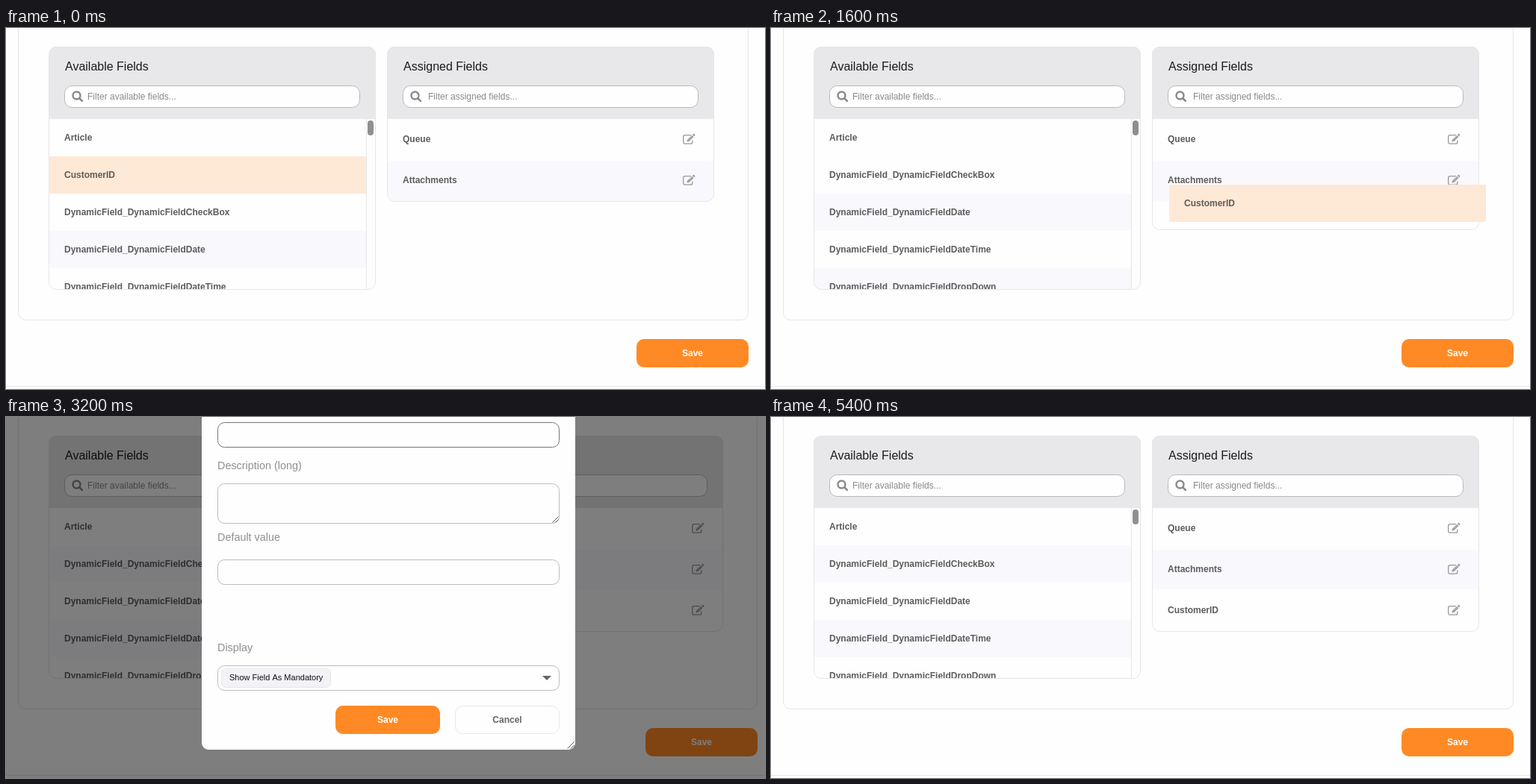
Write an HTML page with a canvas that moves like this. It is 1016 px wide and 484 px high and loops after 6000 ms.

```html
<!DOCTYPE html>
<html lang="en">
<head>
<meta charset="utf-8">
<title>Assigning fields</title>
<style>
html, body { margin: 0; width: 100%; height: 100%; overflow: hidden; background: #fefefe; }
canvas { display: block; width: 1016px; height: 484px; }
</style>
</head>
<body>
<canvas id="stage" width="1016" height="484"></canvas>
<script>
const ctx = document.getElementById('stage').getContext('2d');
const LOOP = 6000, STEP = 200;
const DRAG = 800, OPEN = 2600, HOVER = 3400, SUBMIT = 3800, CLOSE = 4000;
const PAPER = '#fefefe', LINE = '#e6e6ea', STRIPE = '#f9f9fd', PEACH = '#fee8d6';
const ORANGE = '#ff8a25', INK = '#5c5c5c', FAMILY = '"Liberation Sans", Arial, sans-serif';
const FIELDS = ['CheckBox', 'Date', 'DateTime', 'DropDown']
  .map(name => 'DynamicField_DynamicField' + name);

// time, x, y of the dragged row
const PATH = [
  [800, 150, 178], [1000, 426, 189], [1200, 510, 206],
  [1400, 541, 214], [1800, 524, 206], [2200, 517, 204], [2600, 517, 204]
];

function text(str, x, y, size, color, weight = '', align = 'left') {
  ctx.font = `${weight} ${size}px ${FAMILY}`;
  ctx.textAlign = align;
  ctx.fillStyle = color;
  ctx.fillText(str, x, y);
}

const bold = (str, x, y) => text(str, x, y, 12, INK, 'bold');

function rect(x, y, w, h, color) {
  ctx.fillStyle = color;
  ctx.fillRect(x, y, w, h);
}

function box(x, y, w, h, r, fill, stroke) {
  const inset = stroke ? 0.5 : 0;
  ctx.beginPath();
  ctx.roundRect(x + inset, y + inset, w - 2 * inset, h - 2 * inset, r);
  if (fill) {
    ctx.fillStyle = fill;
    ctx.fill();
  }
  if (stroke) {
    ctx.strokeStyle = stroke;
    ctx.lineWidth = 1;
    ctx.stroke();
  }
}

function line(points, color, width = 1) {
  ctx.beginPath();
  points.forEach(([x, y]) => ctx.lineTo(x, y));
  ctx.strokeStyle = color;
  ctx.lineWidth = width;
  ctx.stroke();
}

function button(label, x, y, w, fill, color, stroke) {
  box(x, y, w, 38, 10, fill, stroke);
  text(label, x + w / 2, y + 23, 12, color, 'bold', 'center');
}

function searchIcon(x, y) {
  ctx.beginPath();
  ctx.arc(x, y, 5, 0, 7);
  ctx.strokeStyle = '#8a8a8a';
  ctx.lineWidth = 2.4;
  ctx.stroke();
  ctx.lineCap = 'round';
  line([[x + 4, y + 4], [x + 7.4, y + 7.4]], '#8a8a8a', 2.6);
  ctx.lineCap = 'butt';
}

function editIcon(x, y) {
  ctx.save();
  ctx.translate(x, y);
  ctx.beginPath();
  ctx.moveTo(3, -5.4);
  ctx.lineTo(-5, -5.4);
  ctx.arcTo(-7.3, -5.4, -7.3, -3, 2.3);
  ctx.lineTo(-7.3, 4);
  ctx.arcTo(-7.3, 6.2, -5, 6.2, 2.3);
  ctx.lineTo(2.5, 6.2);
  ctx.arcTo(4.8, 6.2, 4.8, 4, 2.3);
  ctx.lineTo(4.8, 1.6);
  ctx.strokeStyle = '#999';
  ctx.lineWidth = 1.3;
  ctx.stroke();
  line([[-0.6, 1.6], [5.4, -4.2]], '#999', 3.2);
  line([[6, -4.8], [7.6, -6.3]], '#999', 3.2);
  ctx.beginPath();
  ctx.moveTo(-2.6, 3.4);
  ctx.lineTo(-2, 0.2);
  ctx.lineTo(0.8, 3);
  ctx.fillStyle = '#999';
  ctx.fill();
  line([[0.2, 0.4], [4.6, -3.8]], '#d8d8d8', 0.7);
  ctx.restore();
}

function panel(x, w, bottom, title, hint, hintX, rows) {
  const h = bottom - 25;
  box(x, 25, w, h, 10, PAPER);
  ctx.save();
  ctx.beginPath();
  ctx.roundRect(x, 25, w, h, 10);
  ctx.clip();
  rect(x, 25, w, 97, '#e8e8ea');
  rows();
  ctx.restore();
  box(x, 25, w, h, 10, null, LINE);
  text(title, x + 22, 57, 16, '#1c1c1c');
  box(x + 21, 77, w - 42, 30, 10, PAPER, '#b9b9b9');
  searchIcon(x + 37.5, 90.5);
  text(hint, hintX, 96, 12, '#8a8a8a');
}

function availableRows(t) {
  const idle = t < DRAG, dragging = t >= DRAG && t < OPEN;
  const names = ['Article', ...(idle ? ['CustomerID'] : []), ...FIELDS];
  names.slice(0, 5).forEach((name, i) => {
    const y = 122 + 50 * i;
    const striped = dragging ? i > 0 && i % 2 === 0 : i % 2 === 1;
    if (striped) rect(58, y, 424, 50, idle && i === 1 ? PEACH : STRIPE);
    bold(name, 78, y + 29);
  });
  rect(482, 122, 1, 229, LINE);
  box(484, 124, 8, 20, 4, '#8f8f8f');
}

function assignedRows(t, right) {
  const names = ['Queue', 'Attachments', ...(t >= OPEN ? ['CustomerID'] : [])];
  rect(511, 178, right - 511, t < OPEN ? 55 : 53, STRIPE);
  names.forEach((name, i) => {
    bold(name, 531, 153 + 55 * i);
    editIcon(right - 34, 149 + 55 * i);
  });
}

function page(t, wider) {
  rect(0, 0, 1016, 484, PAPER);
  box(16, -30, 978 + wider, 422, 10, null, LINE);
  panel(57, 438, 351, 'Available Fields', 'Filter available fields...', 109,
    () => availableRows(t));
  const bottom = t < DRAG + STEP ? 233 : t < OPEN ? 271 : 288;
  panel(510, 438 + wider, bottom, 'Assigned Fields', 'Filter assigned fields...', 565,
    () => assignedRows(t, 948 + wider));
  button('Save', 844 + wider, 417, 150, ORANGE, '#fff');
  rect(0, 480, 1016, 1, '#e8e8e8');
}

function draggedRow(t) {
  const i = PATH.findIndex(p => p[0] > t);
  const [t0, x0, y0] = PATH[i - 1], [t1, x1, y1] = PATH[i];
  const k = (t - t0) / (t1 - t0);
  const x = Math.round(x0 + (x1 - x0) * k), y = Math.round(y0 + (y1 - y0) * k);
  rect(x, y, 424, 50, PEACH);
  bold('CustomerID', x + 20, y + 29);
}

function grip(x, y, size) {
  line([[x - size, y], [x, y - size]], '#555');
  line([[x - size / 2, y], [x, y - size / 2]], '#555');
}

function dialog(t) {
  const sent = t >= SUBMIT;
  const input = (y, h, fill = PAPER, stroke = '#bcbcbc') => box(283, y, 458, h, 9, fill, stroke);
  const label = (str, y) => text(str, 283, y, 14.4, '#8f8f8f');

  rect(0, 0, 1016, 484, 'rgba(0, 0, 0, 0.5)');
  box(262, -20, 500, 466, 9, PAPER);
  input(7, 34, PAPER, t > OPEN ? '#777' : '#bcbcbc');
  if (!sent && (t - OPEN) % 1000 < 500) rect(294, 17, 1, 14, '#111');
  label('Description (long)', 70);
  input(89, 54);
  grip(739.5, 141.5, 8);
  label('Default value', 166);
  input(191, 34, sent ? '#eeeeee' : PAPER);
  label('Display', 314);
  input(333, 34);
  box(288, 337, 147, 26, 6, '#f3f3f7', '#e6e6ea');
  text('Show Field As Mandatory', 299, 353, 11, '#111');
  ctx.beginPath();
  ctx.moveTo(718, 347);
  ctx.lineTo(730, 347);
  ctx.lineTo(724, 353);
  ctx.fillStyle = '#666';
  ctx.fill();
  button('Save', 441, 387, 140, t >= HOVER ? '#f08000' : ORANGE, '#fff');
  button('Cancel', 601, 387, 140, PAPER, '#666', '#e8e8e8');
  grip(760.5, 444.5, 9);
}

function draw(now) {
  const t = Math.floor(now % LOOP / STEP) * STEP;
  const open = t >= OPEN && t < CLOSE;
  page(t, open ? 12 : 0);
  if (t >= DRAG && t < OPEN) draggedRow(t);
  if (open) dialog(t);
}

function tick() {
  draw(performance.now());
  requestAnimationFrame(tick);
}
tick();
</script>
</body>
</html>
```
